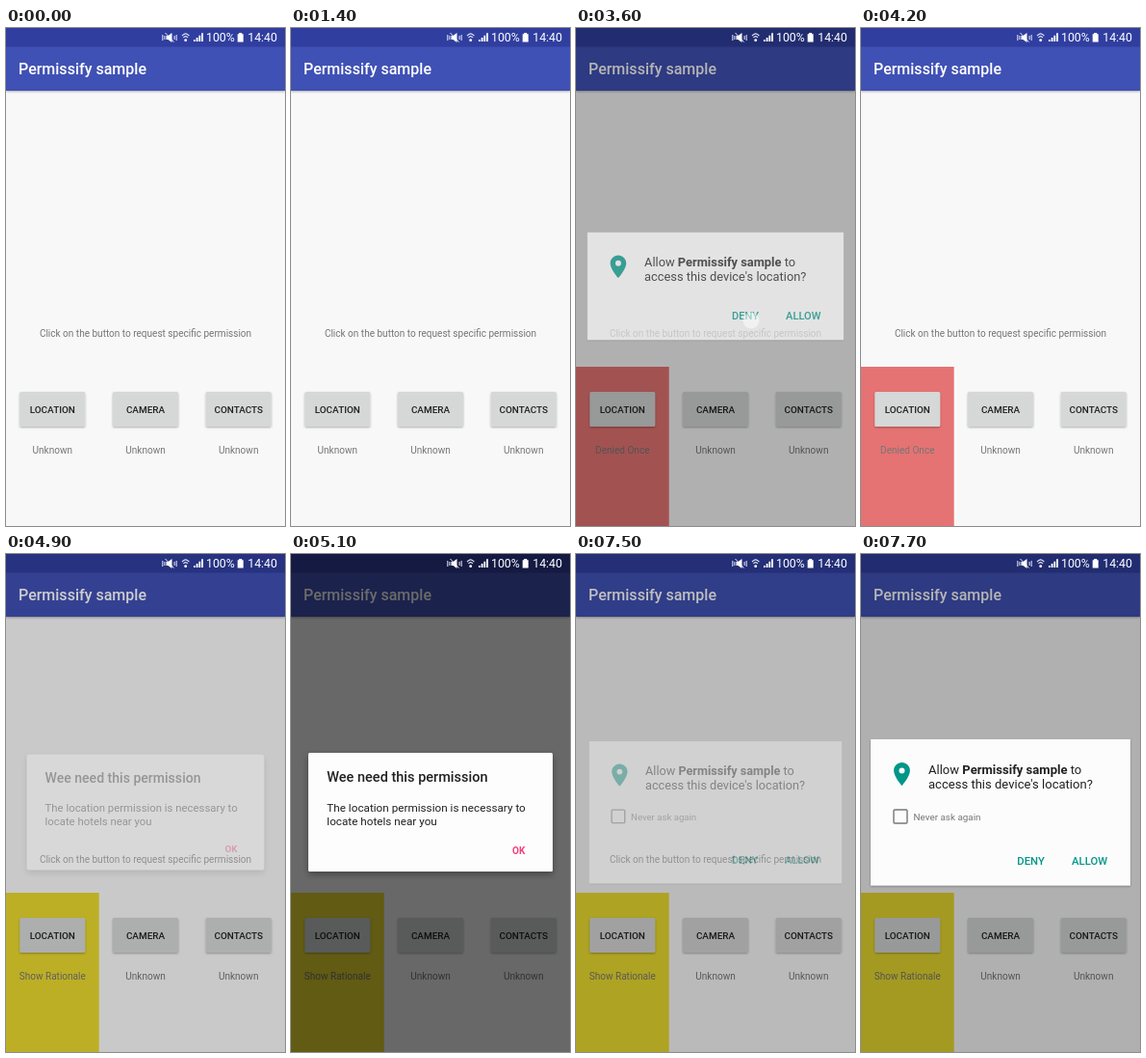
An HTML page that plays this animation: 290x516 px, repeating every 8 s.

```html
<!DOCTYPE html>
<html lang="en">
<head>
<meta charset="utf-8">
<title>Permission sample</title>
<style>
  html, body { margin: 0; width: 100%; height: 100%; overflow: hidden; background: #f9f8f8; }
  svg { display: block; width: 100%; height: 100%; }
  text { font-family: Roboto, sans-serif; white-space: pre; }
  .m { font-weight: 500; }
  .b { font-weight: 700; }
  .mid { text-anchor: middle; }
</style>
</head>
<body>
<svg viewBox="0 0 290 516" preserveAspectRatio="none">
  <defs>
    <filter id="lift" x="-10%" y="-20%" width="120%" height="150%">
      <feDropShadow dx="0" dy="1" stdDeviation=".8" flood-opacity=".3"/>
    </filter>
    <filter id="float" x="-10%" y="-10%" width="120%" height="125%">
      <feDropShadow dx="0" dy="3" stdDeviation="3.5" flood-opacity=".35"/>
    </filter>
    <path id="pin" fill="#009688" transform="scale(1.2) translate(-12 -12)"
      d="M12 2C8.1 2 5 5.1 5 9c0 5.3 7 13 7 13s7-7.7 7-13c0-3.9-3.1-7-7-7zm0 9.5a2.5 2.5 0 1 1 0-5 2.5 2.5 0 0 1 0 5z"/>
  </defs>

  <rect width="290" height="516" fill="#f9f8f8"/>
  <rect y="19" width="290" height="46" fill="#3f51b5" filter="url(#lift)"/>
  <rect width="290" height="19.5" fill="#303f9f"/>
  <text x="13" y="48.3" font-size="16" fill="#fff" class="m">Permissify sample</text>
  <text x="145" y="319.8" font-size="10.04" fill="#757575" class="mid">Click on the button to request specific permission</text>
  <rect id="cell" y="351" width="96.7" height="165"/>
  <g id="columns"></g>
  <rect id="dim" width="290" height="516"/>

  <g id="statusIcons" fill="#fff" stroke="none">
    <g fill="none" stroke="#e8eaf6" stroke-width="1">
      <path d="M162.8 7v6M164.9 8v4M175.1 8v4M177.2 7v6M165.5 5l9 9.5"/>
      <path d="M183 8.2q3.7-4.6 7.4 0M184.4 10q2.3-2.7 4.6 0" stroke-width="1.1"/>
    </g>
    <path d="M166.5 8h2l4-3v10l-4-3h-2z"/>
    <circle cx="186.7" cy="12.7" r="1.4"/>
    <path d="M195 12h1.8v2H195zM197.7 10h1.8v4h-1.8zM200.4 7.7h1.8V14h-1.8zM203.1 5.3h1.8V14h-1.8z"/>
    <path d="M242.2 5h3v1.2h1.5V14.6h-6V6.2h1.5z"/>
    <text x="208" y="14.3" font-size="12.3">100%</text>
    <text x="251.3" y="14.3" font-size="12.3">14:40</text>
  </g>

  <g id="ask"></g>
  <g id="rationale">
    <rect x="18" y="206" width="254" height="123" rx="1.6" fill="#fdfdfd" filter="url(#float)"/>
    <g fill="#212121">
      <text x="37.3" y="236" font-size="14.5" class="m">Wee need this permission</text>
      <text x="37.3" y="267" font-size="11.72">The location permission is necessary to</text>
      <text x="37.3" y="281" font-size="11.72">locate hotels near you</text>
    </g>
    <text x="236.8" y="310.7" font-size="10.1" fill="#f5407f" class="b mid">OK</text>
  </g>
  <g id="askAgain"></g>
  <circle id="touch" cx="182" cy="303" r="8.5" fill="#fff" opacity=".5"/>
</svg>
<script>
const LOOP = 8000, STEP = 100;
const $ = id => document.getElementById(id);

$('columns').innerHTML = ['LOCATION', 'CAMERA', 'CONTACTS'].map((label, i) => {
  const x = 48.3 + i * 96.7;
  return `<rect x="${x - 34}" y="377" width="68" height="36" rx="1.6" fill="#d6d7d7" filter="url(#lift)"/>
    <text x="${x}" y="398.6" font-size="9.95" fill="#202020" class="m mid">${label}</text>
    <text x="${x}" y="440.7" font-size="10.04" fill="#757575" class="mid state">Unknown</text>`;
}).join('');
const locationState = document.querySelector('.state');

function askDialog(top, height, extra = '') {
  const bottom = top + height;
  return `<rect x="10" y="${top}" width="270" height="${height}" fill="#fcfcfc" filter="url(#lift)"/>
    <use href="#pin" x="42.5" y="${top + 36}"/>
    <g font-size="13.05" fill="#212121">
      <text x="70" y="${top + 36}">Allow <tspan class="b">Permissify sample</tspan> to</text>
      <text x="70" y="${top + 51}">access this device's location?</text>
    </g>${extra}
    <g font-size="11.3" fill="#009688" class="m">
      <text x="162.3" y="${bottom - 21.4}">DENY</text>
      <text x="219" y="${bottom - 21.4}">ALLOW</text>
    </g>`;
}
$('ask').innerHTML = askDialog(211, 113);
$('askAgain').innerHTML = askDialog(192, 151.5, `
  <rect x="34" y="265" width="14" height="14" rx="1" fill="none" stroke="#777" stroke-width="1.4"/>
  <text x="54.5" y="276" font-size="9.9" fill="#777">Never ask again</text>`);

// Linear interpolation through [time, value] pairs
function track(t, keys) {
  const next = keys.findIndex(k => k[0] > t);
  if (next < 0) return keys[keys.length - 1][1];
  if (next === 0) return keys[0][1];
  const [t0, a] = keys[next - 1], [t1, b] = keys[next];
  return a + (b - a) * (t - t0) / (t1 - t0);
}

const dimKeys = [[1800, 0], [2100, .29], [3600, .29], [3800, 0],
  [4800, 0], [5100, .58], [5300, .6], [7200, .6], [7500, .25], [7700, .29]];
const dialogs = [
  ['ask', 267.5, [[1800, 0], [1900, .3], [2000, .8], [2100, 1], [3500, 1], [3600, .68], [3700, .2], [3800, 0]]],
  ['rationale', 267.5, [[4800, 0], [4900, .3], [5000, .8], [5100, 1], [7200, 1], [7300, .6], [7400, 0]]],
  ['askAgain', 267.8, [[7400, 0], [7500, .35], [7600, .8], [7700, 1]]]
];

function draw(t) {
  const [state, color] = t < 3500 ? ['Unknown', 'none']
    : t < 4900 ? ['Denied Once', '#e57373'] : ['Show Rationale', '#e8d92e'];
  locationState.textContent = state;
  $('cell').setAttribute('fill', color);
  $('dim').setAttribute('opacity', track(t, dimKeys));
  for (const [id, cy, keys] of dialogs) {
    const shown = track(t, keys), scale = .957 + .043 * shown;
    $(id).setAttribute('opacity', shown);
    $(id).setAttribute('transform', `translate(145 ${cy}) scale(${scale}) translate(-145 ${-cy})`);
  }
  $('touch').style.display = t >= 3500 && t < 3700 ? '' : 'none';
}

const start = performance.now();
function tick() {
  const elapsed = (performance.now() - start) % LOOP;
  draw(Math.floor(elapsed / STEP) * STEP);
  requestAnimationFrame(tick);
}
tick();
</script>
</body>
</html>
```
